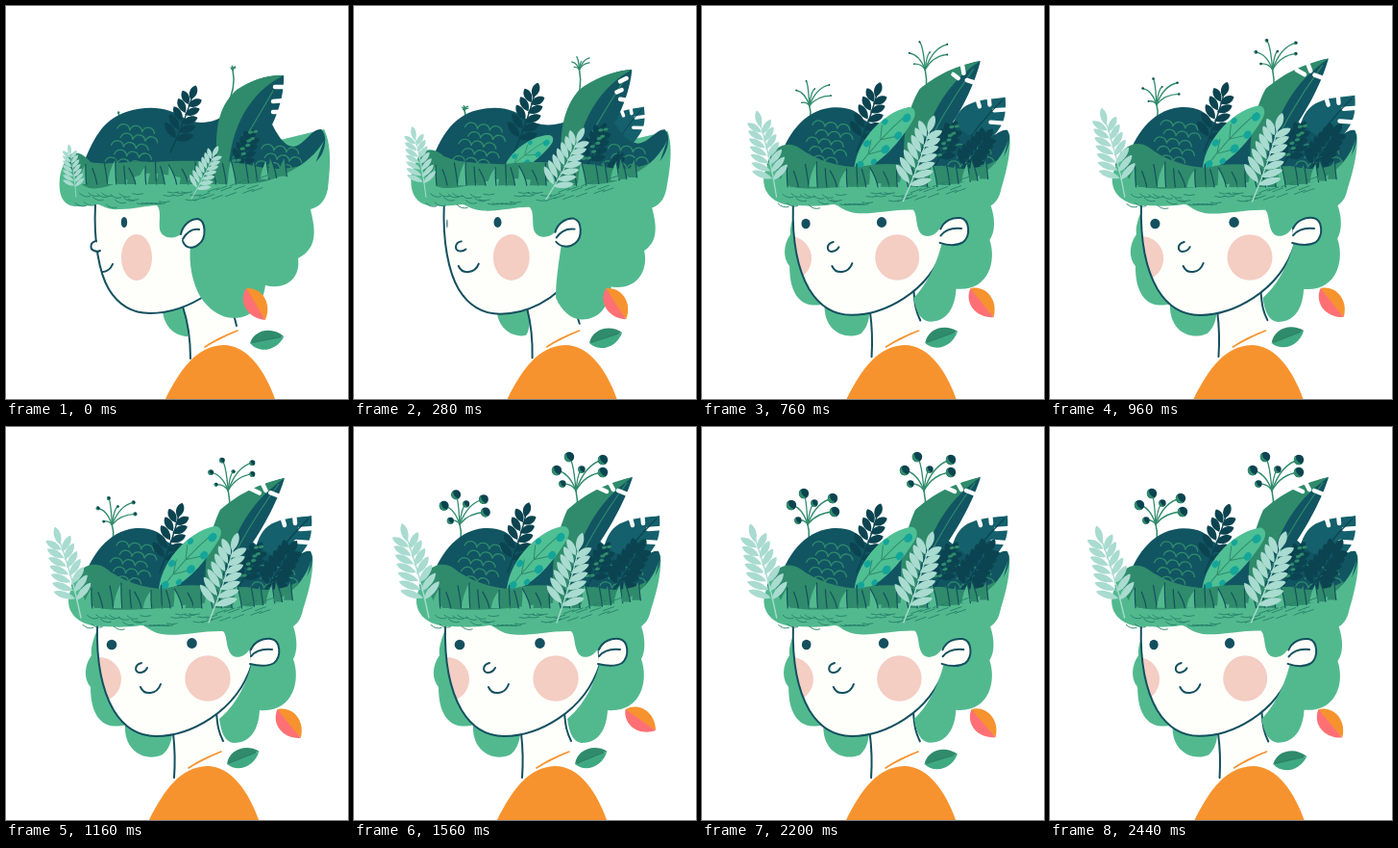
Recreate the animation shown at these times as an HTML page. Size 356 by 408 pixels, loop 2480 ms.

```html
<!DOCTYPE html>
<html lang="en">
<head>
<meta charset="utf-8">
<title>Garden hair</title>
<style>
html, body { margin: 0; width: 100%; height: 100%; overflow: hidden; background: #fff; }
svg { display: block; width: 100vw; height: 100vh; }
</style>
</head>
<body>
<svg id="stage" viewBox="0 0 356 408" fill="none" stroke-linecap="round" stroke-linejoin="round"></svg>
<script>
const NS = 'http://www.w3.org/2000/svg';
const stage = document.getElementById('stage');
const LOOP = 2480, STEP = 40;
const TIMES = [0, 280, 760, 1160, 1560, 1960, 2440];
const C = {
  hair: '#52b98f', moss: '#2f8b6b', deep: '#115562', ink: '#14505f', night: '#0b4450',
  skin: '#fefefa', blush: '#f4cdc3', orange: '#f7932e', coral: '#ff7074',
  mint: '#a9dbd0', teal: '#14a59a', blue: '#14606c'
};
const updates = [];

function el(tag, attrs, parent = stage) {
  const n = document.createElementNS(NS, tag);
  set(n, attrs);
  parent.appendChild(n);
  return n;
}
function set(n, attrs) {
  for (const k in attrs) n.setAttribute(k, attrs[k]);
}

// Monotone cubic through the key times
function track(...v) {
  const n = v.length - 1;
  const s = i => (v[i + 1] - v[i]) / (TIMES[i + 1] - TIMES[i]);
  const m = v.map((_, i) => {
    if (i === 0) return s(0);
    if (i === n) return s(n - 1);
    const a = s(i - 1), b = s(i);
    return a * b <= 0 ? 0 : 2 * a * b / (a + b);
  });
  return t => {
    let i = 0;
    while (i < n - 1 && t >= TIMES[i + 1]) i++;
    const h = TIMES[i + 1] - TIMES[i], u = (t - TIMES[i]) / h;
    const u2 = u * u, u3 = u2 * u;
    return v[i] * (2 * u3 - 3 * u2 + 1) + v[i + 1] * (3 * u2 - 2 * u3)
      + h * (m[i] * (u3 - 2 * u2 + u) + m[i + 1] * (u3 - u2));
  };
}
const turn = track(0, .376, .908, 1, 1, .965, .908);
const grow = track(0, .3, .75, .95, 1, 1, 1);
const mix = (a, b, p) => a + (b - a) * p;

// Path whose numbers blend from a to b
function morph(a, b, attrs, by = turn, parent = stage) {
  const n = el('path', attrs, parent);
  const to = b.match(/-?[\d.]+/g);
  updates.push(t => {
    const p = by(t);
    let i = 0;
    n.setAttribute('d', a.replace(/-?[\d.]+/g, x => mix(+x, +to[i++], p).toFixed(2)));
  });
  return n;
}
// Group moved from a to b, with its own turn and size
function place(a, b, rot, size, by = turn) {
  const g = el('g', {});
  updates.push(t => {
    const p = by(t);
    g.setAttribute('transform',
      `translate(${mix(a[0], b[0], p)} ${mix(a[1], b[1], p)}) rotate(${rot(t)}) scale(${size(t)})`);
  });
  return g;
}
function blob(a, b, fill, parent) {
  const n = el('ellipse', { fill }, parent);
  updates.push(t => {
    const p = turn(t), v = a.map((x, i) => mix(x, b[i], p));
    set(n, { cx: v[0], cy: v[1], rx: Math.max(0, v[2]), ry: v[3] });
  });
}
let seed = 7;
const rnd = () => (seed = seed * 16807 % 2147483647) / 2147483647;
const line = (color, w) => ({ stroke: color, 'stroke-width': w });

function fern(g, len, pairs, leaf, wide, color) {
  el('path', { d: `M0 0Q${len * .04} ${-len / 2} 0 ${-len}`, ...line(color, 1.4) }, g);
  const blade = (y, l, a) => el('path', {
    d: `M0 0C${-wide} ${-l * .4} ${-wide * .6} ${-l * .85} 0 ${-l}C${wide * .6} ${-l * .85} ${wide} ${-l * .4} 0 0Z`,
    fill: color, transform: `translate(0 ${y}) rotate(${a})`
  }, g);
  for (let i = 0; i < pairs; i++) {
    const u = i / pairs, y = -len * (.2 + .66 * u), l = leaf * (1 - .25 * u);
    blade(y, l, 56 - 14 * u);
    blade(y - 2, l, -56 + 14 * u);
  }
  blade(-len + leaf * .6, leaf * .8, 0);
}

function sprig(hubA, hubB, foot, ends, branch, berry) {
  const stem = el('path', line(C.moss, 1.5));
  const parts = ends.map(([x, y], i) => ({
    x, y, r: i % 3 === 2 ? 3.7 : 5.2,
    arm: el('path', line(C.moss, 1.3)),
    dot: el('g', {})
  }));
  for (const q of parts) {
    el('circle', { r: q.r, fill: C.night }, q.dot);
    el('path', { d: `M${-q.r} 0A${q.r} ${q.r} 0 0 0 ${q.r} 0Q0 ${q.r * .8} ${-q.r} 0Z`, fill: C.moss, transform: 'rotate(55)' }, q.dot);
  }
  updates.push(t => {
    const p = grow(t), k = branch(t), b = berry(t);
    const hx = mix(hubA[0], hubB[0], p), hy = mix(hubA[1], hubB[1], p);
    stem.setAttribute('d', `M${foot[0]} ${foot[1]}Q${hx + 4} ${(hy + foot[1]) / 2} ${hx} ${hy}`);
    for (const q of parts) {
      const x = hx + q.x * k, y = hy + q.y * k;
      q.arm.setAttribute('d', `M${hx} ${hy}Q${hx + q.x * k * .35} ${hy + q.y * k * .8 - 2 * k} ${x} ${y}`);
      q.dot.setAttribute('transform', `translate(${x} ${y}) scale(${b})`);
    }
  });
}

// Back hair, neck and shoulders
morph('M134 205C127 222 123 230 123 237C116 248 116 262 122 270C122 285 125 297 132 304C138 311 149 312 159 309L174 300L134 200Z',
  'M97 205C90 222 88 230 89 237C81 248 81 262 88 270C88 285 91 297 98 304C104 311 115 312 125 309L140 300L100 200Z', { fill: C.hair });
morph('M163 317C165 334 177 343 189 343C192 335 190 325 186 312Z',
  'M124 308C122 338 146 348 163 340C169 335 172 328 173 319Z', { fill: C.hair });
morph('M184 312C190 330 192 348 192 366L241 337C238 325 235 310 234 290Z',
  'M174 318C176 335 176 350 175 364L226 337C223 322 220 315 219 295Z', { fill: C.skin });
morph('M184 312C190 330 192 348 192 366M234 290C235 310 237 322 240 332',
  'M174 318C176 335 176 350 175 364M219 295C220 312 222 318 226 326', line(C.ink, 2));
morph('M166 408C182 376 199 353 226 352C252 352 270 380 280 408ZM207 354Q220 345 241 337',
  'M149 408C165 376 182 353 209 352C235 352 253 380 263 408ZM190 354Q203 345 224 337', { fill: C.orange });
morph('M207 354Q220 345 241 337', 'M190 354Q203 345 224 337', line(C.orange, 1.6));

// Face
const faceA = 'M93 206C91 245 97 277 107 294C118 312 133 319 150 319C172 319 192 311 210 299L235 190L95 190Z';
const faceB = 'M95 207C94 245 101 275 112 294C123 312 138 321 156 321C190 321 240 297 256 246L250 190L97 190Z';
const clip = el('clipPath', { id: 'face' }, el('defs', {}));
morph(faceA, faceB, {}, turn, clip);
morph(faceA, faceB, { fill: C.skin });
const inner = el('g', { 'clip-path': 'url(#face)' });
blob([32, 262, 23, 23], [97, 262, 23, 23], C.blush, inner);
blob([136, 261, 16, 24], [210, 261, 23.7, 23.7], C.blush, inner);
blob([89, 226, -2.3, 4], [110, 226, 5.3, 5.3], C.ink, inner);
blob([123, 224.5, 3.2, 5.5], [193.5, 224.5, 5.3, 5.4], C.ink, inner);
morph('M90 270C94 279 107 278 111 268', 'M140 270C144 279 157 278 161 267', line(C.ink, 2), turn, inner);
morph(faceA, faceB, line(C.ink, 2));
morph('M94 244C87 245 87 253 92 254C94 255 96 255 98 254', 'M141 245C133 247 134 255 139 255C143 255 146 252 147 250',
  { fill: C.skin, ...line(C.ink, 2) });

// Side hair
morph('M240 150L331 128C340 146 337 172 335 190C332 204 325 209 317 211C320 226 328 250 304 262C307 284 290 295 270 290C267 312 255 324 237 324C224 324 211 315 203 303C194 288 190 268 192 248L200 190Z',
  'M240 150L319 133C321 152 313 178 309 190C307 200 303 204 299 207C303 218 304 232 299 241C307 263 299 297 264 294C263 312 256 328 237 328C228 327 224 318 222 303C236 292 250 270 256 244L250 190Z', { fill: C.hair });

// Plants at the back
sprig([117, 111], [110, 101], [107, 130],
  [[-17, -20], [-4, -32], [7, -22], [26, -27], [28, -13], [-10, -4]],
  track(.03, .14, .8, .86, .96, 1, 1), track(0, 0, .15, .38, .95, 1, 1));
sprig([236, 66], [231, 66], [229, 105],
  [[-20, -21], [-7, -35], [6, -22], [28, -32], [28, -19], [-14, -7]],
  track(.1, .38, .82, .9, 1, 1, 1), track(0, 0, .18, .55, 1, 1, 1));

const monstera = place([262, 162], [262, 162], track(-12, -4, 0, 0, 0, 0, 0), track(.2, .78, .96, 1, 1, 1, 1));
el('path', { d: 'M0 0C-8 -25 -2 -56 18 -63C32 -69 46 -68 56 -70C57 -56 56 -44 48 -34C38 -20 20 -5 0 0Z', fill: C.blue }, monstera);
el('path', { d: 'M58 -57L44 -56M54 -42L40 -43M25 -70L28 -60M38 -72L39 -62', ...line('#fff', 4.5) }, monstera);
el('path', { d: 'M3 -5Q25 -40 53 -67', ...line(C.night, 1.2) }, monstera);

morph('M80 165C90 140 100 118 125 110C150 102 170 106 185 116C200 124 215 122 230 112L270 108C280 130 288 146 300 146C312 143 318 127 328 128C336 135 332 155 322 162C290 180 250 185 200 182C150 185 100 180 80 165Z',
  'M80 160C88 135 105 108 135 105C152 104 163 110 166 118C185 130 205 130 225 125L255 118C268 128 280 138 292 137C304 136 310 127 317 129C321 136 319 150 306 166C290 180 250 185 200 182C150 185 100 180 80 160Z', { fill: C.deep });

// Scallops on the hills
function scallops(a, b, rows, cols) {
  let d = '';
  for (let r = 0; r < rows; r++)
    for (let c = 0; c < cols; c++)
      d += `M${c * 13 + (r % 2) * 6.5 - r * 2} ${r * 9}a6.8 7.5 0 0 1 13 0`;
  el('path', { d, ...line(C.moss, 1.3) }, place(a, b, () => 8, () => 1));
}
scallops([116, 127], [115, 123], 5, 3);
scallops([266, 148], [262, 148], 3, 3);

morph('M228 165C215 130 225 95 245 85C258 76 272 72 289 72C290 88 284 115 270 135C262 148 255 158 248 166Z',
  'M214 172C208 140 218 100 250 75C262 64 275 55 290 52C284 72 268 104 250 128C243 140 235 160 230 172Z', { fill: C.deep }, grow);
morph('M220 165C217 130 220 105 240 87C255 77 272 71 289 72C262 85 236 115 232 166Z',
  'M208 168C204 135 214 104 222 86C236 74 255 60 290 52C262 72 236 100 222 168Z', { fill: C.moss }, grow);
morph('M236 158Q255 128 278 88', 'M222 165Q245 110 284 58', line(C.moss, 1.2), grow);
morph('M292 84L280 84M290 98L278 99M286 110L278 110', 'M264 54L270 65M252 62L263 67M285 70L275 66', line('#fff', 4.5), grow);

fern(place([240, 170], [243, 165], track(24, 24, 26, 27, 27, 27, 26), track(.9, 1, 1, 1, 1, 1, 1)), 48, 4, 17, 6, C.night);
const specks = place([238, 166], [244, 160], () => 0, () => 1);
for (let i = 0; i < 9; i++)
  el('ellipse', { cx: i * 2.6 + rnd() * 8, cy: -i * 4 - rnd() * 6, rx: 2.6, ry: 1.6, fill: C.moss, transform: 'rotate(-8)' }, specks);
fern(place([264, 176], [265, 176], track(30, 34, 38, 33, 33, 34, 34), track(.2, .4, .86, .97, 1, 1, 1)), 67, 6, 22, 7, C.night);
fern(place([171, 152], [160, 151], track(21, 19, 19, 18, 17, 19, 20), track(.98, 1, 1, 1, 1, 1, 1)), 72, 5, 20, 6.5, C.night);

// Spotted leaf
const spotted = place([150, 178], [159, 172], track(64, 50, 40, 40, 40, 40, 41), track(.42, .72, .98, 1, 1, 1, 1));
el('path', { d: 'M0 0C-18 -22 -19 -66 0 -90C5 -95 12 -91 13 -80C17 -50 16 -20 0 0Z', fill: '#4fbf94' }, spotted);
el('path', { d: 'M0 0Q-3 -45 4 -84M-1 -25L-8 -38M0 -25L9 -38M-1 -45L-9 -57M0 -45L10 -58', ...line(C.moss, 1) }, spotted);
for (const [x, y, r] of [[6, -80, 5], [11, -60, 4.5], [10, -40, 5], [-9, -62, 3.5], [-9, -32, 4], [0, -10, 4.5], [9, -22, 3.5]])
  el('ellipse', { cx: x, cy: y, rx: r * .8, ry: r, fill: C.teal }, spotted);

// Undergrowth and front hair
morph('M62 165C64 150 76 148 88 162C105 166 130 160 150 162C190 160 220 160 250 164C280 172 300 170 322 160L290 190L80 192Z',
  'M68 165C74 145 90 138 103 146C120 160 145 168 165 168C190 160 220 168 250 166C275 172 290 168 305 160L290 190L80 192Z', { fill: C.moss });
morph('M65 146C66 156 58 164 56 178C54 198 60 209 76 208C85 208 92 206 96 206C100 207 106 212 118 211C134 211 146 207 157 207C162 212 159 222 160 232C163 244 182 243 188 230L210 235L300 220L331 140C315 168 270 190 235 184C200 186 170 172 145 174C115 182 95 196 80 186C70 180 64 165 65 146Z',
  'M74 150C74 160 64 170 65 182C66 198 82 208 103 207C112 208 130 208 140 206C146 205 148 212 162 215C178 218 205 211 226 212C230 216 229 225 232 232C236 243 250 240 255 228L270 222L300 206L318 138C305 178 270 190 235 184C205 180 180 186 165 188C125 190 100 192 86 184C76 174 78 160 74 150Z', { fill: C.hair });

const turf = place([-4, -3], [2, 0], () => 0, () => 1);
for (let i = 0; i < 21; i++) {
  const x = 80 + i * 10.5 + rnd() * 4, y = 188 - Math.max(0, x - 240) * .16;
  const h = 15 + rnd() * 12, lean = (rnd() - .5) * 10;
  const tip = `${x + lean} ${y - h}`;
  el('path', { d: `M${x - 4} ${y}Q${x - 3} ${y - h * .5} ${tip}Q${x + 4} ${y - h * .4} ${x + 5} ${y}`, fill: i % 3 ? C.moss : C.hair }, turf);
  el('path', { d: `M${x + 5} ${y}Q${x + 4} ${y - h * .4} ${tip}`, ...line(C.ink, 1.2) }, turf);
}
const strands = place([-6, 0], [2, 1], () => 0, () => 1);
for (let i = 0; i < 42; i++) {
  const x = 78 + i * 4.6, y = 193 + rnd() * 13 - Math.max(0, x - 200) * .2;
  const dy = x < 130 ? 3 : x > 200 ? -4 : 0;
  el('path', { d: `M${x} ${y}q5 ${dy + 2} 11 ${dy}`, ...line('#268069', .9) }, strands);
}

// Ear
morph('M182 237C184 227 192 221 200 221C208 223 209 241 201 247C196 252 187 253 184 244',
  'M255 231C259 222 268 219 276 220C286 222 287 238 279 245C272 249 262 248 254 246', { fill: C.skin, ...line(C.ink, 2) });
morph('M184 242C188 235 194 231 201 232', 'M255 238C260 232 268 230 277 231', line(C.ink, 2));

// Pale ferns in front
fern(place([73, 198], [78, 198], track(-8, -11, -13, -16, -16, -15, -17), track(.54, .73, .9, .96, 1, 1, .98)), 97, 7, 25, 6, C.mint);
fern(place([193, 200], [211, 203], track(27, 28, 20, 18, 16, 16, 21), track(.6, .83, .93, .96, .95, .96, .99)), 97, 7, 26, 6.5, C.mint);

// Falling leaves
function leaf(a, b, rot, len, half, top, low, vein) {
  const g = place(a, b, rot, () => 1);
  const side = s => `M0 0C${len * .2} ${s} ${len * .72} ${s} ${len} 0Z`;
  el('path', { d: side(-half), fill: top }, g);
  el('path', { d: side(half), fill: low }, g);
  el('path', { d: `M2 0L${len - 4} 0`, ...line(vein, .8) }, g);
}
leaf([250, 293], [282.5, 293], track(58.8, 57, 51.5, 51, 35, 48, 50), 38.5, 15, C.orange, C.coral, '#f5803f');
leaf([254, 350], [230, 350], track(-11, -18, -20, -22, -22, -20, -13), 36, 13, C.moss, '#3fa981', '#1f735f');

function draw(now) {
  const t = Math.floor(now % LOOP / STEP) * STEP;
  for (const u of updates) u(t);
}
const start = performance.now();
function tick() {
  draw(performance.now() - start);
  requestAnimationFrame(tick);
}
tick();
</script>
</body>
</html>
```
